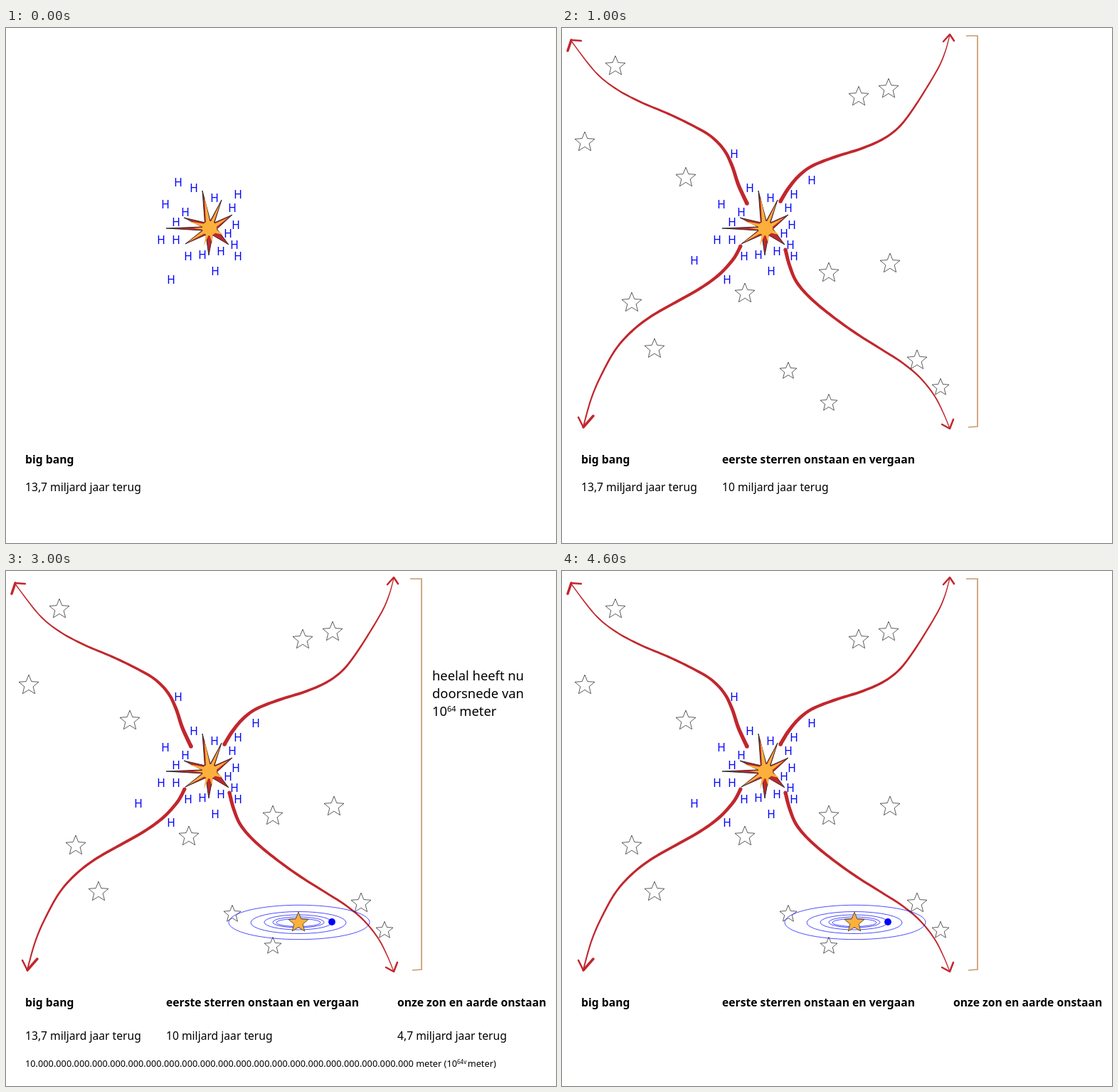
These frames come from a looping animation (773 by 725 pixels, 5 s). An HTML page:

```html
<!DOCTYPE html>
<html lang="nl">
<head>
<meta charset="utf-8">
<title>Big bang</title>
<style>
  html, body { margin: 0; width: 100%; height: 100%; overflow: hidden; background: #fff; }
  svg { display: block; width: 773px; height: 725px; }
  text { font: 15.65px "Noto Sans", "Open Sans", sans-serif; }
  .title { font-weight: bold; font-size: 15.7px; }
  .h { fill: #00f; text-anchor: middle; }
  .size { font-size: 18.35px; }
  .long { font-size: 12.75px; }
  .line { fill: none; stroke: #c1272d; stroke-linecap: round; stroke-linejoin: round; }
  .orbit { fill: none; stroke: #00f; stroke-width: .7; }
  .star { fill: none; stroke: #333; stroke-width: .8; }
</style>
</head>
<body>
<svg viewBox="0 0 773 725">
  <g id="space" data-on="1234">
    <g class="line" stroke-width="2.5">
      <path d="M8 32L13 17" stroke-width="3.5"/>
      <path d="M13 17L27 18"/>
      <path d="M536 19L545 9L551 18"/>
      <path d="M23 548L30 562"/>
      <path d="M30 562L44 546" stroke-width="3.5"/>
      <path d="M534 558L545 564L550 551"/>
    </g>
    <path d="M568 11H584V561L571 562" fill="none" stroke="#c69c6d" stroke-width="1.7"/>
  </g>
  <g id="burst"></g>
  <g id="atoms"></g>
  <g id="sun" data-on="234">
    <ellipse class="orbit" cx="412" cy="494.5" rx="99" ry="24.2"/>
    <ellipse class="orbit" cx="411" cy="495" rx="67" ry="15.5"/>
    <ellipse class="orbit" cx="410.5" cy="494.5" rx="47.5" ry="10.5"/>
    <ellipse class="orbit" cx="411" cy="494.5" rx="36" ry="7.5"/>
    <ellipse class="orbit" cx="411" cy="495" rx="31" ry="5.5"/>
    <circle cx="458" cy="494" r="4.9" fill="#00f"/>
  </g>
  <g class="labels">
    <text class="title" x="27" y="613">big bang</text>
    <text class="title" x="225" y="613" data-on="1234">eerste sterren onstaan en vergaan</text>
    <text class="title" x="550" y="613" data-on="234">onze zon en aarde onstaan</text>
  </g>
  <g id="years" data-on="0123">
    <text x="27" y="652">13,7 miljard jaar terug</text>
    <text x="225" y="652" data-on="123">10 miljard jaar terug</text>
    <text x="550" y="652" data-on="23">4,7 miljard jaar terug</text>
  </g>
  <g data-on="3">
    <text class="size" x="599" y="154">heelal heeft nu</text>
    <text class="size" x="599" y="179">doorsnede van</text>
    <text class="size" x="599" y="204">10<tspan dy="-6" font-size="11">64</tspan><tspan dy="6"> meter</tspan></text>
    <text class="long" x="27" y="698"><tspan id="zeros"></tspan> meter (10<tspan dy="-4" font-size="8">64v</tspan><tspan dy="4" dx="1.5">meter)</tspan></text>
  </g>
</svg>
<script>
const $ = id => document.getElementById(id);

function add(parent, tag, attrs, text = "") {
  const el = document.createElementNS("http://www.w3.org/2000/svg", tag);
  for (const key in attrs) el.setAttribute(key, attrs[key]);
  el.textContent = text;
  return parent.appendChild(el);
}

// "x,y x,y ..." to pairs of numbers
const pairs = s => s.split(" ").map(p => p.split(",").map(Number));

function starPoints(x, y, r) {
  return Array.from({ length: 10 }, (_, i) => {
    const a = i * Math.PI / 5, d = i % 2 ? r * .44 : r;
    return [x + d * Math.sin(a), y - d * Math.cos(a)].map(v => v.toFixed(2));
  }).join(" ");
}

function star(parent, x, y, r, attrs) {
  add(parent, "polygon", { points: starPoints(x, y, r), ...attrs });
}

// Smooth curve through the points, as a ribbon narrowing from w0 to w1
function ribbon(points, w0, w1) {
  const p = pairs(points), n = p.length - 1, steps = n * 8;
  const at = u => {
    const i = Math.min(n - 1, Math.floor(u * n)), t = u * n - i;
    const [a, b, c, d] = [-1, 0, 1, 2].map(k => p[Math.max(0, Math.min(n, i + k))]);
    return [0, 1].map(k => b[k] + t / 2 * (c[k] - a[k]
      + t * (2 * a[k] - 5 * b[k] + 4 * c[k] - d[k] + t * (3 * (b[k] - c[k]) + d[k] - a[k]))));
  };
  const left = [], right = [];
  for (let i = 0; i <= steps; i++) {
    const u = i / steps, [x, y] = at(u);
    const [x0, y0] = at(Math.max(0, u - .005)), [x1, y1] = at(Math.min(1, u + .005));
    const len = Math.hypot(x1 - x0, y1 - y0), w = (w0 + (w1 - w0) * u) / 2;
    const dx = (y0 - y1) / len * w, dy = (x1 - x0) / len * w;
    left.push([x + dx, y + dy]);
    right.unshift([x - dx, y - dy]);
  }
  add($("space"), "polygon", { points: left.concat(right).join(" "), fill: "#c1272d" });
  add($("space"), "circle", { cx: p[0][0], cy: p[0][1], r: w0 / 2, fill: "#c1272d" });
}

// Spiky shape: a notch at radius r halfway between neighbouring tips
function spikes(tips, r, attrs) {
  const cx = 286, cy = 282, p = pairs(tips);
  const angle = ([x, y]) => Math.atan2(y - cy, x - cx);
  const points = p.flatMap((tip, i) => {
    const a = angle(tip), b = angle(p[(i + 1) % p.length]);
    const m = Math.atan2(Math.sin(a) + Math.sin(b), Math.cos(a) + Math.cos(b));
    return [tip, [cx + r * Math.cos(m), cy + r * Math.sin(m)]];
  });
  add($("burst"), "polygon", { points: points.join(" "), ...attrs });
}

ribbon("260,247 248,221 239,194 228,172 210,153 185,138 150,121 110,104 75,85 46,61 12,17", 5.6, 1.4);
ribbon("307,244 318,226 333,208 352,194 385,181 420,170 450,157 472,141 490,119 512,85 530,54 539,32 545,10", 5.4, 1.2);
ribbon("251,307 241,325 221,347 195,366 160,386 125,406 98,427 75,453 55,489 41,522 30,561", 5, 1.9);
ribbon("314,312 320,335 330,358 350,381 380,406 415,431 450,453 478,471 503,492 523,517 536,542 545,564", 5.2, 1.2);

for (const [x, y] of pairs("75,53 32,160 174,210 417,96 459,85 375,344 461,331 257,373 98,386 130,451 499,467"))
  star($("space"), x, y + .8, 14.7, { class: "star" });
for (const [x, y] of pairs("318,482 375,527 532,505"))
  star($("space"), x, y + 1, 12.6, { class: "star" });
star($("sun"), 411, 495, 14.8, { fill: "#fbb03b", stroke: "#333", "stroke-width": .8 });

spikes("276,229 303,242 318,263 313,305 285,320 252,304 225,282 250,267", 10.5,
  { fill: "#c1272d", stroke: "#222", "stroke-width": .9 });
spikes("279,238 301,247 312,267 305,291 290,304 278,307 255,302 263,282 256,272", 7.5, { fill: "#fbb03b" });
add($("burst"), "circle", { cx: 286, cy: 282, r: 10.3, fill: "#fbb03b" });

function atom(x, y, on) {
  add($("atoms"), "text", { x, y: y + 5.6, class: "h", "data-on": on }, "H");
}
for (const [x, y] of pairs("264,225 293,239 326,234 318,253 224,248 252,259 239,273 323,277 312,289 218,298 239,298 321,305 302,314 326,321 276,319 256,321 294,342 232,354"))
  atom(x, y, "01234");
atom(242, 217, "0");
for (const [x, y] of pairs("242,177 351,214 186,327")) atom(x, y, "1234");

$("zeros").textContent = "10" + ".000".repeat(21);

const staged = document.querySelectorAll("[data-on]");
const start = performance.now();

function draw() {
  const stage = Math.floor((performance.now() - start) % 5000 / 1000);
  for (const el of staged) el.style.display = el.dataset.on.includes(stage) ? "" : "none";
  $("years").setAttribute("transform", `translate(0 ${stage === 3 ? 8 : 0})`);
  requestAnimationFrame(draw);
}
draw();
</script>
</body>
</html>
```
